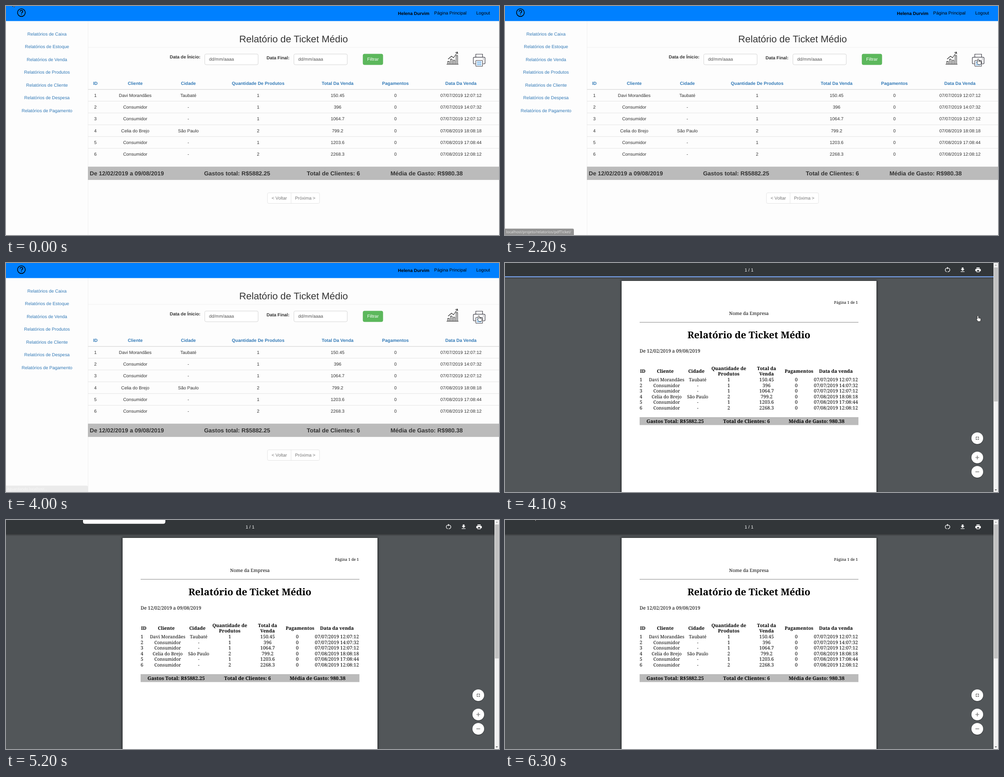
These frames come from a looping animation (1095x511 px, 6500 ms). An HTML page:

```html
<!DOCTYPE html>
<html lang="pt-BR">
<head>
<meta charset="utf-8">
<title>Relatório de Ticket Médio</title>
<style>
  html, body { margin: 0; width: 100%; height: 100%; overflow: hidden; background: #fdfdfd; }
  svg { display: block; width: 100%; height: 100%; }
  text { white-space: pre; text-rendering: geometricPrecision; }
  .web { font: 9.98px "Liberation Sans", Arial, sans-serif; fill: #333; }
  .pdf { font: 10.1px "Noto Serif", serif; fill: #000; }
  .num { font-size: 10.6px; }
  .b { font-weight: 700; }
  .link { fill: #337ab7; }
  .title { font-size: 21.39px; }
  .sum { font-size: 13px; font-weight: 700; }
  .soft { fill: #777; }
  .field { fill: #555; }
  .light { fill: #fff; }
  .dark { fill: #000; }
  .pdf .title { font-size: 21px; font-weight: 700; }
  .pdf .small { font-size: 8.45px; }
  .pdf .head { font-size: 10.4px; font-weight: 700; }
  .pdf .foot { font-size: 10.9px; font-weight: 700; }
  .tip { font: 8.3px "Open Sans", "Noto Sans", sans-serif; fill: #575757; }
  #status text { font: 8.15px "Open Sans", "Noto Sans", sans-serif; fill: #d6d6d6; }
</style>
</head>
<body>
<svg id="stage" viewBox="0 0 1095 511">
  <defs>
    <linearGradient id="fall" x2="0" y2="1">
      <stop offset="0" stop-opacity=".35"/><stop offset="1" stop-opacity="0"/>
    </linearGradient>
    <filter id="blur" x="-10%" y="-10%" width="120%" height="120%"><feGaussianBlur stdDeviation="2"/></filter>
  </defs>
  <g id="web" class="web"></g>
  <g id="pdf" class="pdf"></g>
  <g id="status">
    <path id="bubble" fill="#2b2b2b"/>
    <text id="message" x="2.5" y="507.3"></text>
  </g>
  <g id="tip">
    <rect x="1043.5" y="127.5" width="51" height="17" fill="#fff" stroke="#767676" stroke-width=".8"/>
    <text class="tip" x="1069" y="139" text-anchor="middle">Imprimir</text>
  </g>
  <g id="card">
    <rect x="-.5" y="-8" width="184" height="17.6" rx="5" opacity=".3"/>
    <rect y="-8" width="183" height="16.6" rx="4.5" fill="#fff"/>
  </g>
  <path id="arrow" d="M.4 .5V9.4L2.4 7.5 3.8 10.7 5.3 10.1 4 7H6.7Z" fill="#fff" stroke="#000" stroke-width=".7"/>
  <g id="hand" fill="#fff" stroke="#111" stroke-width=".8" stroke-linejoin="round">
    <path d="M3.3 .5C4.4 .5 4.9 1.2 4.9 2V5Q6 4.6 6.6 5.4 7.6 5 8.2 6 10 5.8 10 7.4V10.2L8.9 13.6H3.8L.7 9.2C.1 8 1.2 7.1 2.1 8V2Q2.1 .5 3.3 .5Z"/>
    <path d="M4.9 5V7.4M6.6 5.4V7.6M8.2 6V7.8" fill="none" stroke-width=".6"/>
  </g>
</svg>
<script>
const $ = id => document.getElementById(id);
const text = (x, y, s, cls = '', anchor = 'middle') =>
  `<text x="${x}" y="${y}" class="${cls}" text-anchor="${anchor}">${s}</text>`;
const left = (x, y, s, cls) => text(x, y, s, cls, 'start');
const rect = (x, y, w, h, fill, more = '') =>
  `<rect x="${x}" y="${y}" width="${w}" height="${h}" fill="${fill}" ${more}/>`;
const line = (d, color, width = 1, more = '') =>
  `<path d="${d}" fill="none" stroke="${color}" stroke-width="${width}" ${more}/>`;

const rows = [
  ['Davi Morandães', 'Taubaté', 1, '150.45', '07/07/2019 12:07:12'],
  ['Consumidor', '-', 1, '396', '07/07/2019 14:07:32'],
  ['Consumidor', '-', 1, '1064.7', '07/07/2019 12:07:12'],
  ['Celia do Brejo', 'São Paulo', 2, '799.2', '07/08/2019 18:08:18'],
  ['Consumidor', '-', 1, '1203.6', '07/08/2019 17:08:44'],
  ['Consumidor', '-', 2, '2268.3', '07/08/2019 12:08:12']
].map(([name, city, qty, total, date], i) => [i + 1, name, city, qty, total, 0, date]);

function table(cols, top, step, numCls = '') {
  return rows.map((row, i) => row.map((v, c) =>
    text(cols[c], top + step * i, v, c === 1 || c === 2 ? '' : numCls)).join('')).join('');
}

function webPage() {
  const cols = [198.5, 287, 405, 560, 736.5, 865, 1010.5];
  const heads = ['ID', 'Cliente', 'Cidade', 'Quantidade De Produtos', 'Total Da Venda', 'Pagamentos', 'Data Da Venda'];
  const menu = ['Caixa', 'Estoque', 'Venda', 'Produtos', 'Cliente', 'Despesa', 'Pagamento'];
  const field = x => rect(x + .5, 107.2, 118.5, 23.8, '#fff', 'rx="3" stroke="#ccc" stroke-width=".8"') +
    left(x + 10, 122.3, 'dd/mm/aaaa', 'field');
  const bar = (x, y) => `M${x} 129.8V${y}h3.2V129.8`;
  return rect(0, 0, 1095, 511, '#fdfdfd') + rect(0, 0, 1095, 33.6, '#0080ff') +
    '<circle cx="34.2" cy="14.8" r="8.6" fill="none" stroke="#000" stroke-width="1.6"/>' +
    line('M31.3 12.6C31.3 8.8 37.2 9 37.2 12.4C37.2 14.6 34.3 14.4 34.3 16.8M34.3 18.2V19.8', '#000', 1.6) +
    left(870.5, 20, 'Helena Durvim', 'b dark') + left(951, 19, 'Página Principal', 'dark') + left(1044.5, 19, 'Logout', 'dark') +
    menu.map((m, i) => text(91, 65.6 + 28.55 * i, 'Relatórios de ' + m, 'link')).join('') +
    line('M182.2 34V511M182 92.2H1095', '#eee', .8) +
    text(638.7, 81.4, 'Relatório de Ticket Médio', 'title') +
    left(363.7, 117, 'Data de Ínicio:', 'b') + field(441) + left(578.7, 118.6, 'Data Final:', 'b') + field(639) +
    rect(793, 107.2, 44, 23.8, '#5cb85c', 'rx="3" stroke="#4cae4c" stroke-width=".8"') + text(815, 122.3, 'Filtrar', 'light') +
    line('M978.5 130H1005' + bar(981.2, 123.5) + bar(987.4, 118.5) + bar(993.6, 121) + bar(999.8, 110.5), '#222', 1.1) +
    line('M982 118.5L989.5 112L994 115.5L1002.5 103.5M998 104L1002.8 102.8L1003.3 107.5', '#222', 1.1) +
    line('M1043.5 114V107.5H1058.5V114M1043 129H1040Q1038 129 1038 127V116.5Q1038 114.3 1040 114.3H1062Q1064 114.3 1064 116.5V127Q1064 129 1062 129H1059', '#3c3c46', 1.2) +
    rect(1043.5, 121.5, 15, 13, '#fff', 'stroke="#3c3c46" stroke-width="1.1" rx="1"') +
    line('M1046 124.8H1056M1046 128H1056M1046 131.2H1056', '#2b8ce0', 1.2) + line('M1059 118H1061', '#3c3c46', 1.2) +
    heads.map((h, i) => text(cols[i], 175.8, h, 'b link')).join('') +
    line('M182 186.2H1095', '#ddd', 1.4) +
    rows.slice(1).map((_, i) => line(`M182 ${212.4 + 26.3 * i}H1095`, '#ddd', .8)).join('') +
    table(cols, 202.6, 26.3) +
    rect(182, 358.5, 913, 29.6, '#bbb') +
    left(186, 378, 'De 12/02/2019 a 09/08/2019', 'sum') + left(440, 378, 'Gastos total: R$5882.25', 'sum') +
    left(668, 378, 'Total de Clientes: 6', 'sum') + left(854, 378, 'Média de Gasto: R$980.38', 'sum') +
    rect(580.7, 416.8, 115.8, 23.7, '#fff', 'rx="3" stroke="#ddd" stroke-width=".8"') +
    line('M633.2 417V440.5', '#ddd', .8) +
    text(607, 431.8, '&lt; Voltar', 'soft') + text(664.5, 431.8, 'Próxima &gt;', 'soft');
}

function pdfPage() {
  const cols = [302, 359, 428, 497, 581, 647, 735];
  const heads = [[306, 'ID'], [356, 'Cliente'], [425, 'Cidade'], [653, 'Pagamentos'], [735, 'Data da venda']];
  const round = (y, glyph) => `<circle cx="1049" cy="${y + 1}" r="13.4" opacity=".25"/>
    <circle cx="1049" cy="${y}" r="13" fill="#fff"/>` + line(glyph, '#5a5a5a', 1.2, `transform="translate(1049 ${y})"`);
  return rect(0, 0, 1095, 511, '#525659') +
    rect(257.5, 39, 569, 480, '#000', 'opacity=".5" filter="url(#blur)"') + rect(259, 40, 566, 480, '#fff') +
    rect(0, 31, 1085, 5, 'url(#fall)') + rect(0, 0, 1085, 31.5, '#323639') +
    '<g class="web">' + text(542, 18.8, '1 / 1', 'light') + '</g>' +
    line('M984.5 11.3A4.2 4.2 0 0 1 983.2 19.6M981.4 19.6A4.2 4.2 0 0 1 981.6 11.3H983', '#fff', 1.3) +
    '<path d="M982 8.6V14L985 11.3ZM1014.6 10H1018.2V13.6H1020.6L1016.4 17.7 1012.2 13.6H1014.6ZM1012.2 18.7H1020.6V20H1012.2Z" fill="#fff"/>' +
    '<path d="M1047.2 10H1054.2V12.2H1047.2ZM1046.5 12.9H1054.8Q1056.8 12.9 1056.8 14.8V18.2H1054.2V20.4H1047.2V18.2H1044.6V14.8Q1044.6 12.9 1046.5 12.9ZM1048.4 16V19.2H1053V16Z" fill="#fff" fill-rule="evenodd"/>' +
    rect(0, 29.7, 1085, 2.2, '#7aa5f0', 'id="progress"') +
    text(757.3, 91, 'Página 1 de 1', 'small') + text(541.8, 116, 'Nome da Empresa') +
    line('M299 132.3H785', '#777', .9) +
    text(541.7, 168, 'Relatório de Ticket Médio', 'title') + left(299, 200, 'De 12/02/2019 a 09/08/2019', 'num') +
    heads.map(([x, s]) => text(x, 245.2, s, 'head')).join('') +
    text(497, 239, 'Quantidade de', 'head') + text(497, 251.4, 'Produtos', 'head') +
    text(581, 239, 'Total da', 'head') + text(581, 251.4, 'Venda', 'head') +
    table(cols, 264.2, 12.56, 'num') +
    rect(299, 344, 486, 17.6, '#bbb') +
    text(378, 356.6, 'Gastos Total: R$5882.25', 'foot') + text(536.5, 356.6, 'Total de Clientes: 6', 'foot') +
    text(692, 356.6, 'Média de Gasto: 980.38', 'foot') +
    round(391, 'M-4 -1.6H-1.6V-4M4 -1.6H1.6V-4M-4 1.6H-1.6V4M4 1.6H1.6V4') +
    round(434, 'M-4.2 0H4.2M0 -4.2V4.2') + round(466, 'M-4.2 0H4.2') +
    rect(1085, 0, 10, 511, '#f1f1f1') + rect(1086, 10, 8.5, 299, '#c1c1c1') +
    '<path d="M1087.8 6L1090.2 3.2L1092.6 6Z" fill="#a3a3a3"/><path d="M1087.8 505.2L1090.2 508L1092.6 505.2Z" fill="#505050"/>';
}

$('web').innerHTML = webPage();
$('pdf').innerHTML = pdfPage();

// Pointer moves: start, end, x0, y0, x1, y1
const moves = [
  [0, 0, 14, -8, 14, -8],
  [200, 700, 14, -8, 629, 273],
  [1000, 1000, 637, 268, 637, 268],
  [1100, 1700, 637, 268, 1038, 148],
  [1800, 1800, 1034, 151, 1034, 151],
  [1900, 1900, 1039, 135, 1039, 135],
  [2000, 2000, 1047, 119, 1047, 119],
  [2200, 2200, 1047.5, 117.3, 1047.5, 117.3],
  [2900, 3100, 1047.5, 117.3, 1046.8, 117],
  [4400, 4700, 1047, 117, 323, 21],
  [5800, 6000, 39, -6, 50, 0],
  [6000, 6300, 50, 0, 64, -8]
];
const clamp = v => Math.min(1, Math.max(0, v));
const mix = (a, b, p) => a + (b - a) * p;
const within = (t, a, b) => t >= a && t < b;
const show = (id, on) => $(id).setAttribute('visibility', on ? 'visible' : 'hidden');
const place = (id, x, y) => $(id).setAttribute('transform', `translate(${x} ${y})`);

function drawPointer(t) {
  const on = !within(t, 4800, 5800);
  const hand = within(t, 2000, 4500);
  show('arrow', on && !hand);
  show('hand', on && hand);
  const [t0, t1, x0, y0, x1, y1] = moves.filter(m => m[0] <= t).pop();
  const k = t1 > t0 ? clamp((t - t0) / (t1 - t0)) : 1;
  const p = k * k * (3 - 2 * k);
  place(hand ? 'hand' : 'arrow', mix(x0, x1, p), mix(y0, y1, p));
}

function drawStatus(t) {
  const waiting = t >= 3600;
  const width = !waiting ? 153 : t < 3900 ? 364 : 182;
  const alpha = t < 2300 ? .5 : t < 3900 ? 1 : t < 4000 ? .5 : .08;
  show('status', within(t, 2200, 4100));
  $('status').setAttribute('opacity', alpha);
  $('bubble').setAttribute('d', `M0 496.7H${width - 3}q3 0 3 3V511H0Z`);
  $('message').textContent = waiting ? 'Aguardando localhost...' : 'localhost/projeto/relatorios/pdfTicket/';
}

function drawCard(t) {
  show('card', within(t, 5000, 5600));
  const x = t < 5300 ? mix(341, 171, clamp((t - 5000) / 200)) : mix(171, 4, clamp((t - 5300) / 200));
  place('card', x, 0);
}

function draw(ms) {
  const t = Math.floor(ms % 6500 / 100) * 100;
  show('web', t < 4100);
  show('pdf', t >= 4100);
  show('progress', within(t, 4100, 4200));
  show('tip', within(t, 2500, 2900));
  drawStatus(t);
  drawCard(t);
  drawPointer(t);
}

const start = performance.now();
function tick() {
  draw(performance.now() - start);
  requestAnimationFrame(tick);
}
tick();
</script>
</body>
</html>
```
